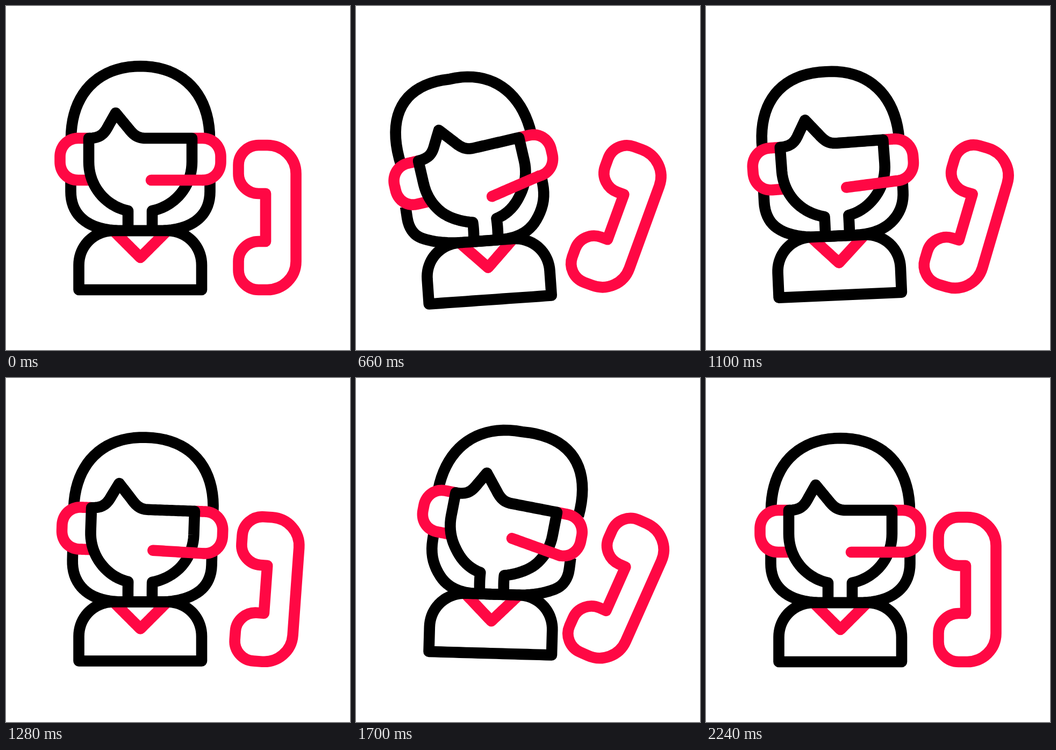
Animation, 640 px wide and 640 px high, one loop 2400 ms. Source, as an HTML page with a canvas:

```html
<!DOCTYPE html>
<html lang="en">
<head>
<meta charset="utf-8">
<title>Support call</title>
<style>
html, body { margin: 0; width: 100%; height: 100%; overflow: hidden; background: #fff; }
canvas { display: block; width: 100vmin; height: 100vmin; }
</style>
</head>
<body>
<canvas id="stage" width="640" height="640"></canvas>
<script>
const ctx = document.getElementById('stage').getContext('2d');
const LOOP = 2400, STEP = 20, RAD = Math.PI / 180;
const BLACK = '#000', PINK = '#ff0844';

// time, head angle, head shift, bob, body tilt
const POSE = [
  [200, 0, 0, 0, 0],
  [380, -3.9, -11, 5, -1],
  [660, -13, -40.5, 18.5, -4],
  [770, -14.5, -45, 22.3, -4.7],
  [1100, -4.2, -16.5, 9.7, -2.5],
  [1280, 2, 5, -1.5, 0],
  [1460, 9.3, 25, -13.2, 1.3],
  [1640, 11.5, 31, -16.5, 1.7],
  [1820, 8.3, 23, -12, 1.2],
  [1920, 4.8, 13, -7, 0.6],
  [2240, 0, 0, 0, 0]
];

// time, handset angle
const RING = [
  [200, 0], [380, 5], [660, 20], [740, 24], [830, 25], [1100, 16.4],
  [1325, 3], [1460, 11], [1650, 25], [1820, 17.5], [1920, 11], [2240, 0]
];

const clamp = (v, a = 0, b = 1) => Math.min(b, Math.max(a, v));
const smooth = v => v * v * (3 - 2 * v);

// Smooth curve through the keys without overshoot
function curve(keys, col, t) {
  const last = keys.length - 1;
  if (t <= keys[0][0]) return keys[0][col];
  if (t >= keys[last][0]) return keys[last][col];
  let i = 0;
  while (keys[i + 1][0] <= t) i++;
  const slope = k => (keys[k + 1][col] - keys[k][col]) / (keys[k + 1][0] - keys[k][0]);
  const tangent = k => {
    if (k === 0 || k === last) return 0;
    const a = slope(k - 1), b = slope(k);
    return a * b <= 0 ? 0 : 2 * a * b / (a + b);
  };
  const h = keys[i + 1][0] - keys[i][0], u = (t - keys[i][0]) / h;
  const a = keys[i][col], b = keys[i + 1][col];
  return a + (b - a) * smooth(u)
    + h * u * (1 - u) * ((1 - u) * tangent(i) - u * tangent(i + 1));
}

// Turns an absolute M/L/C path into closely spaced points
function flatten(d) {
  const pts = [];
  for (const [, cmd, args] of d.matchAll(/([MLC])([^MLC]*)/g)) {
    const n = args.trim().split(/[\s,]+/).map(Number);
    if (cmd === 'M') { pts.push(n); continue; }
    const [x, y] = pts[pts.length - 1];
    for (let i = 1; i <= 20; i++) {
      const u = i / 20, v = 1 - u;
      if (cmd === 'L') pts.push([x * v + n[0] * u, y * v + n[1] * u]);
      else {
        const mix = (p, k) => v * v * v * p + 3 * v * v * u * n[k] + 3 * v * u * u * n[k + 2] + u * u * u * n[k + 4];
        pts.push([mix(x, 0), mix(y, 1)]);
      }
    }
  }
  return pts;
}

const hairTop = flatten('M121 247 C121 165 170 112 250 112 C330 112 379 165 379 247');
const hairLow = flatten('M120.5 326 L120.5 345 C120.5 395 160 418 215 418 L285 418 C340 418 379.5 395 379.5 345 L379.5 326');
const body = flatten('M135.5 528 L135.5 482 C135.5 445 165 418 200 418 L300 418 C335 418 364 445 364 482 L364 528 L135.5 528');
const collar = flatten('M202 420 L250 468 L298 420');
const face = flatten('M227 418 L227 381 C185 372 154 335 154 290 L154 246 C178 246 184 235 191 222 L204 199 L228 228 C238 241 246 246 260 246 L346 246 L346 290 C346 335 315 372 272 381 L272 418');
const earLeft = flatten('M153 246 L134 246 C114 246 100.5 262 100.5 280 L100.5 290 C100.5 309 114 324 134 324 L156 324');
const earRight = flatten('M347 246 L366 246 C386 246 399.5 262 399.5 280 L399.5 290 C399.5 309 386 324 366 324');
const mic = flatten('M366 324 L270 324');
const handset = new Path2D('M483 349 H470 C450 349 432.5 333 432.5 312 V296 C432.5 276 449 259 470 259 H486 C515 259 539.5 282 539.5 312 V475 C539.5 505 515 528 486 528 H470 C449 528 432.5 511 432.5 491 V475 C432.5 454 450 438 470 438 H483 Z');

function turn(x, y, cx, cy, deg, dx, dy) {
  const c = Math.cos(deg * RAD), s = Math.sin(deg * RAD);
  return [cx + dx + (x - cx) * c - (y - cy) * s, cy + dy + (x - cx) * s + (y - cy) * c];
}

// The head and the torso turn as two rigid parts that blend at the neck
function bend(x, y, p) {
  const w = 1 - smooth(clamp((y - 345) / 80));
  const dip = 0.012 * p.angle * p.angle;
  const [hx, hy] = turn(x, y, 250, 246, p.angle, p.shift, p.bob + dip);
  const [bx, by] = turn(x, y, 249.5, 528, p.tilt, 0, p.bob);
  return [bx + (hx - bx) * w, by + (hy - by) * w];
}

function draw(pts, color, p, extra, cap = 'round', close = false) {
  ctx.beginPath();
  for (const [x, y] of pts) {
    const [px, py] = bend(x, y, p);
    const [ex, ey] = extra ? extra(x, y) : [0, 0];
    ctx.lineTo(px + ex, py + ey);
  }
  if (close) ctx.closePath();
  ctx.lineCap = cap;
  ctx.strokeStyle = color;
  ctx.stroke();
}

function render(t) {
  const [angle, shift, bob, tilt] = [1, 2, 3, 4].map(c => curve(POSE, c, t));
  const p = { angle, shift, bob, tilt };
  const lean = Math.abs(angle);
  // The crown bulges on the side the head leans to
  const crown = (x, y) => {
    const side = clamp((x - 250) / 130 * Math.sign(angle));
    const bulge = 1.7 * side * (246 - y) / 134;
    return [0.7 * angle * clamp((x - 120) / 259) + 0.75 * angle * bulge, -0.65 * lean * bulge];
  };
  // The loose ends swing along with the head
  const ends = (x, y) => {
    const side = clamp((Math.abs(x - 250) - 20) / 90);
    const low = clamp((y - 325) / 60);
    return [angle * side * (0.7 + 0.3 * low), 0.35 * angle * (x - 250) / 100 * side * low];
  };
  const sag = x => {
    const k = clamp((366 - x) / 96);
    return [0.5 * lean * k, -1.25 * angle * k];
  };

  ctx.fillStyle = '#fff';
  ctx.fillRect(0, 0, 640, 640);
  ctx.lineWidth = 20.6;
  ctx.lineJoin = 'round';

  draw(hairTop, BLACK, p, crown, 'butt');
  draw(hairLow, BLACK, p, ends, 'butt');
  draw(collar, PINK, p);
  draw(body, BLACK, p, null, 'round', true);
  draw(earLeft, PINK, p);
  draw(earRight, PINK, p);
  draw(face, BLACK, p, null, 'butt');
  draw(mic, PINK, p, sag);

  ctx.save();
  ctx.translate(486, 393.5);
  ctx.rotate(curve(RING, 1, t) * RAD);
  ctx.translate(-486, -393.5);
  ctx.strokeStyle = PINK;
  ctx.stroke(handset);
  ctx.restore();
}

const start = performance.now();
function tick() {
  const t = (performance.now() - start) % LOOP;
  render(Math.floor(t / STEP) * STEP);
  requestAnimationFrame(tick);
}
tick();
</script>
</body>
</html>
```
